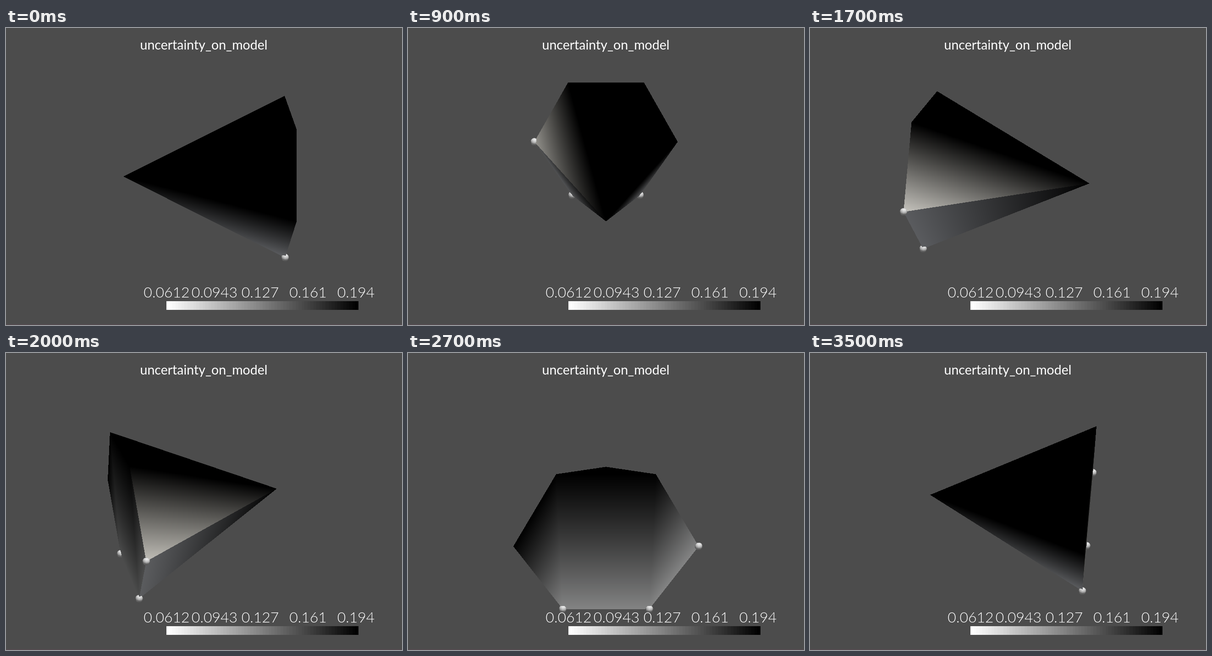
These frames come from a looping animation (864 px wide and 648 px high, 3.6 s). An HTML page with a canvas:

```html
<!DOCTYPE html>
<html>
<head>
<meta charset="utf-8">
<style>
html, body { margin: 0; width: 864px; height: 648px; overflow: hidden; background: #4c4c4c; }
canvas { display: block; }
</style>
</head>
<body>
<canvas id="stage" width="864" height="648"></canvas>
<script>
const ctx = document.getElementById('stage').getContext('2d');
const CX = 432, CY = 324, BG = 76;
const FOCAL = 324 / Math.tan(Math.PI / 12);
const RADIUS = 6, SHIFT = 3.316;            // camera orbit, in half cone heights
const DIST = Math.hypot(RADIUS, SHIFT);
const COS_E = RADIUS / DIST, SIN_E = SHIFT / DIST;
const BOX = { x: 160, y: 100, w: 545, h: 490 };
const DOT = 8.3;
const rad = deg => deg * Math.PI / 180;
const dot = (a, b) => a[0] * b[0] + a[1] * b[1] + a[2] * b[2];

// Camera light kit: elevation, azimuth, strength, colour
const lights = [
  [50, 10, 0.75, [1, 0.98, 0.93]],
  [-75, 0, 0.25, [0.907, 0.933, 1]],
  [0, 0, 0.25, [1, 1, 0.98]],
  [0, 110, 0.214, [1, 1, 0.98]],
  [0, -110, 0.214, [1, 1, 0.98]]
].map(([el, az, power, color]) => ({
  dir: [Math.cos(rad(el)) * Math.sin(rad(az)), Math.sin(rad(el)), Math.cos(rad(el)) * Math.cos(rad(az))],
  color: color.map(c => c * power * 255)
}));

function shade(normal) {
  const sum = [0, 0, 0];
  for (const { dir, color } of lights) {
    const k = Math.max(0, dot(normal, dir));
    for (let i = 0; i < 3; i++) sum[i] += k * color[i];
  }
  return sum;
}

// Hexagonal cone: apex at x = 1, base at x = -1; the last three corners are bright
const bright = [0, 0, 0, 1, 1, 1];
const corners = bright.map((v, i) => [-1, Math.cos(rad(60 * i)), Math.sin(rad(60 * i))]);
const H = Math.sqrt(0.75), slope = Math.hypot(H, 2);
const faces = bright.map((v, i) => {
  const c = Math.cos(rad(60 * i + 30)), s = Math.sin(rad(60 * i + 30));
  const next = bright[(i + 1) % 6];
  return {
    n: [H / slope, 2 * c / slope, 2 * s / slope],
    c: H / slope,
    value(x, y, z) {
      const half = (1 - x) / 4, q = c * z - s * y;
      return v * (half - q) + next * (half + q);
    }
  };
});
faces.push({
  n: [-1, 0, 0],
  c: 1,
  value: (x, y, z) => (H - z) / (2 * H) - y + Math.max(-0.5, Math.min(0.5, y))
});

const image = ctx.createImageData(BOX.w, BOX.h);
const depth = new Float32Array(BOX.w * BOX.h);

function put(i, color, k) {
  for (let c = 0; c < 3; c++) image.data[4 * i + c] = color[c] * k;
}

function drawModel(angle) {
  const a = rad(90 - angle), ca = Math.cos(a), sa = Math.sin(a);
  const right = [-sa, ca, 0];
  const up = [-ca * SIN_E, -sa * SIN_E, COS_E];
  const back = [ca * COS_E, sa * COS_E, SIN_E];
  const toView = p => [dot(p, right), dot(p, up), dot(p, back)];
  const planes = faces.map(face => {
    const n = toView(face.n);
    return { n, k: face.c - n[2] * DIST, color: shade(n), value: face.value };
  });

  for (let j = 0, i = 0; j < BOX.h; j++) {
    const v = (CY - BOX.y - j - 0.5) / FOCAL;
    for (let x = 0; x < BOX.w; x++, i++) {
      const u = (BOX.x + x + 0.5 - CX) / FOCAL;
      let near = 0, far = 1e9, hit;
      for (const plane of planes) {
        const d = plane.n[0] * u + plane.n[1] * v - plane.n[2];
        const t = plane.k / d;
        if (d > 0) { if (t < far) far = t; }
        else if (t > near) { near = t; hit = plane; }
      }
      image.data[4 * i + 3] = 255;
      if (near >= far) {
        depth[i] = 1e9;
        put(i, [BG, BG, BG], 1);
        continue;
      }
      depth[i] = near;
      const X = u * near, Y = v * near, W = DIST - near;
      const p = c => right[c] * X + up[c] * Y + back[c] * W;
      put(i, hit.color, hit.value(p(0), p(1), p(2)));
    }
  }

  corners.forEach((corner, n) => {
    if (bright[n]) drawBall(toView(corner));
  });
  ctx.putImageData(image, BOX.x, BOX.y);
}

function drawBall([X, Y, W]) {
  const k = DIST - W, size = DOT * k / FOCAL;
  const sx = CX + FOCAL * X / k - BOX.x, sy = CY - FOCAL * Y / k - BOX.y;
  for (let y = Math.floor(sy - DOT); y <= sy + DOT; y++) {
    for (let x = Math.floor(sx - DOT); x <= sx + DOT; x++) {
      const nx = (x + 0.5 - sx) / DOT, ny = (sy - y - 0.5) / DOT;
      const rest = 1 - nx * nx - ny * ny;
      if (rest < 0) continue;
      const nz = Math.sqrt(rest), i = y * BOX.w + x, z = k - nz * size;
      if (z > depth[i]) continue;
      depth[i] = z;
      const gray = shade([nx, ny, nz])[1];
      put(i, [gray, gray, gray], 1);
    }
  }
}

function drawLegend() {
  const bands = 64, left = 350, width = 419;
  for (let i = 0; i < bands; i++) {
    const g = Math.round(255 * (1 - i / (bands - 1)));
    const x = Math.round(left + width * i / bands);
    ctx.fillStyle = `rgb(${g},${g},${g})`;
    ctx.fillRect(x, 596, Math.round(left + width * (i + 1) / bands) - x, 19);
  }
  ctx.fillStyle = '#fff';
  ctx.textAlign = 'center';
  ctx.font = '28.5px Lato, sans-serif';
  ctx.fillText('uncertainty_on_model', 431.5, 47);
  ctx.font = '300 32px Lato, sans-serif';
  [['0.0612', 350.5], ['0.0943', 455], ['0.127', 554.5], ['0.161', 659], ['0.194', 763.5]]
    .forEach(([label, x]) => ctx.fillText(label, x, 588));
}

let shown = -1;
function tick() {
  const step = Math.floor(performance.now() / 100) % 36;
  if (step !== shown) {
    shown = step;
    ctx.fillStyle = '#4c4c4c';
    ctx.fillRect(0, 0, 864, 648);
    ctx.fillStyle = '#544b4f';
    ctx.fillRect(0, 646, 864, 2);
    drawModel(step * 10);
    drawLegend();
  }
  requestAnimationFrame(tick);
}
tick();
</script>
</body>
</html>
```
